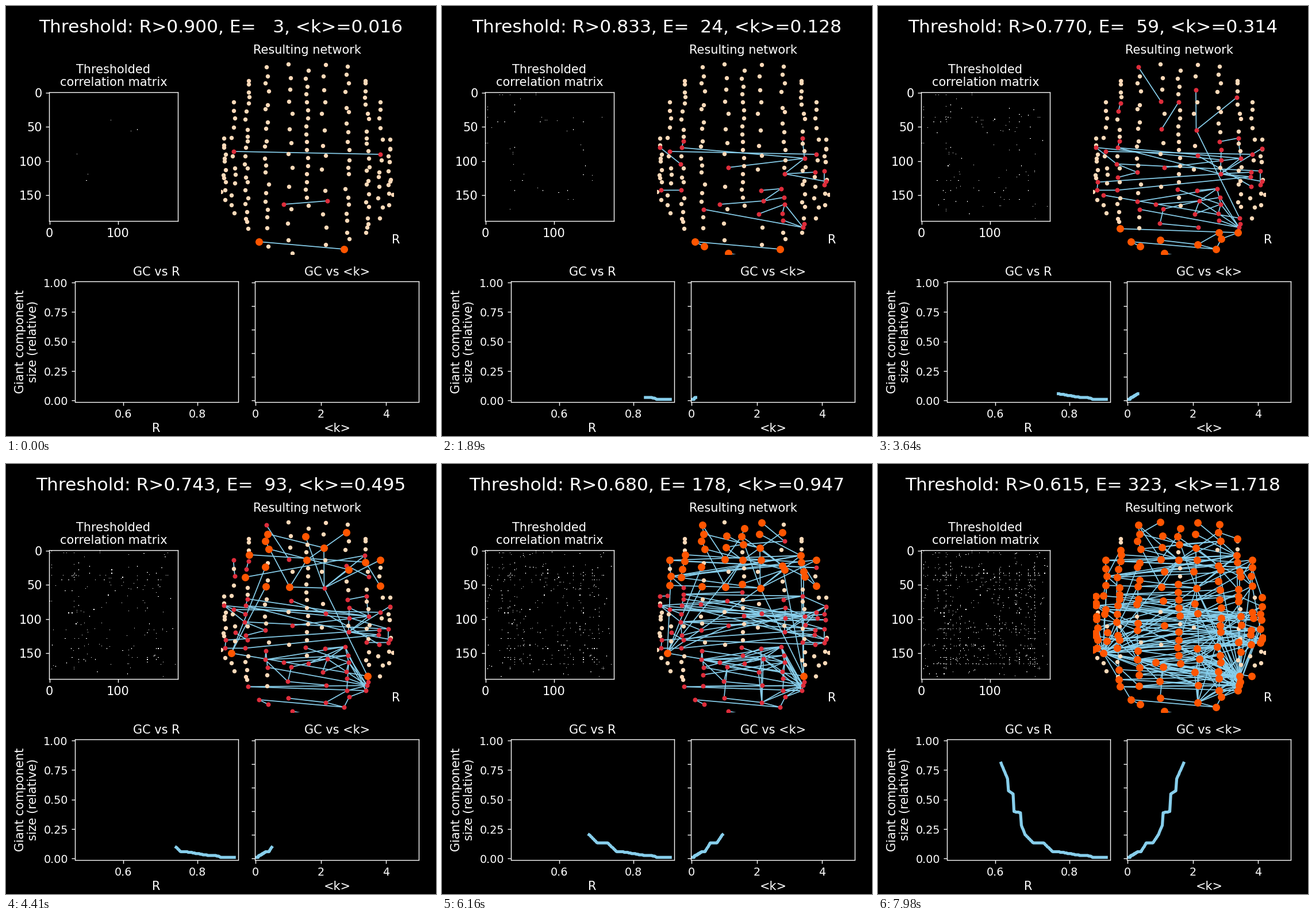
A matplotlib script that plays this animation: 748 by 748 pixels, repeating every 8 s.

```python
import numpy as np
import matplotlib.pyplot as plt
from matplotlib.animation import FuncAnimation
from matplotlib.collections import LineCollection

SIZE, DPI = 748, 125
PT = 72 / DPI
N, STEPS, STEP_MS, TICK_MS = 188, 115, 70, 50
MID_X = 523.5
SKY, PALE, RED, ORANGE = "skyblue", "#ffdab9", "#de2d3b", "#ff5500"

# Node columns: distance from the midline, number of pairs, top, bottom
COLUMNS = [(30, 15, 98, 426), (70, 21, 106, 416), (105, 23, 126, 392),
           (128, 13, 168, 360), (146, 13, 231, 333)]
FIRST_LINKS = [(396, 253), (651, 258), (483, 345), (559, 339), (440, 410), (588, 423)]
ANCHORS = [(392, 329), (629, 369)]

# Node order: frontal core, frontal rim, lowest back, rest of back, then the middle
CORE, FRONT, LOW, BACK, MIDDLE, OUTER = 25, 41, 52, 74, 104, 134
SWITCH = 58  # step at which the frontal component overtakes the back one

EDGE_KEYS = [(0, 3), (27, 24), (52, 59), (72, 120), (88, 178), (98, 232), (114, 323)]
GIANT_KEYS = [(0, 2), (14, 2), (20, 5), (28, 5), (52, 11), (58, 11), (68, 25),
              (79, 25), (88, 38), (92, 53), (93, 73), (100, 75), (101, 103),
              (106, 108), (107, 127), (114, 152)]

rng = np.random.default_rng(5)


def keyed(keys):
    at, value = zip(*keys)
    return np.rint(np.interp(np.arange(STEPS), at, value)).astype(int)


edge_count, giant = keyed(EDGE_KEYS), keyed(GIANT_KEYS)
cutoff = 0.9 - 0.0025 * np.arange(STEPS)
degree = edge_count / N


def scatter_nodes():
    """Mirrored columns of jittered dots plus the midline."""
    parts = []
    for dx, pairs, top, bottom in COLUMNS:
        y = np.linspace(top, bottom, pairs) + rng.uniform(-5, 5, pairs)
        off = dx + rng.uniform(-5, 4, pairs)
        tilt = 0.03 * (y - 120) + rng.uniform(-3, 3, pairs)
        parts += [np.c_[MID_X - off, y], np.c_[MID_X + off, y + tilt]]
    count = N - sum(len(p) for p in parts)
    parts.append(np.c_[MID_X + rng.uniform(-3, 3, count), np.linspace(112, 347, count)])
    return np.vstack(parts)


def snap(points, taken):
    """Move the nearest free node onto each key point."""
    found = []
    for p in points:
        gap = np.hypot(*(nodes - p).T)
        gap[taken + found] = np.inf
        found.append(int(np.argmin(gap)))
        nodes[found[-1]] = p
    return found


def joining_order(first, anchors):
    x, y = nodes.T
    off = np.abs(x - MID_X)
    left = np.ones(N, bool)
    order = []

    def pick(mask, key, count):
        ids = np.flatnonzero(mask & left)
        ids = ids[np.argsort(key[ids])][:count]
        left[ids] = False
        order.extend(ids)

    front = y < 218
    front[anchors] = True
    chance = rng.random(N)
    key = chance + 0.5 * (y < 112)
    key[anchors] = -1
    pick(front, key, FRONT)

    key = -y
    key[first[4:]] = -SIZE
    pick((y > 300) & (off < 95) | (y > 375), key, BACK - FRONT)

    loose = (y > 318) & (off > 95) | (y < 200) & (off < 8)
    key = chance + 0.6 * loose
    key[first[:2]] = -1
    pick(left, key, N)
    return np.array(order)


def grow_network(first, anchors):
    """Links in order of strength; regions stay apart until they join."""
    join, early = np.full(N, 999), np.full(N, SWITCH)
    for step in reversed(range(STEPS)):
        if step >= SWITCH:
            join[:giant[step]] = step
        else:
            early[FRONT:FRONT + giant[step]] = step

    index = np.arange(N)
    region = np.searchsorted([CORE, FRONT, LOW, BACK, MIDDLE, OUTER], index, side="right")
    in_back = (index >= FRONT) & (index < BACK)
    a, b = np.triu_indices(N, 1)
    opens = np.where(in_back[a] & in_back[b], np.maximum(early[a], early[b]),
                     np.maximum(join[a], join[b]))
    opens[(region[a] == region[b]) & (region[a] != 2) & (region[a] < 6)] = 0

    # The middle favours level links, front and back also steep ones
    dx, dy = (nodes[a] - nodes[b]).T
    level = (a >= BACK) & (b >= BACK)
    near = np.hypot(np.where(level, 0.3, 0.5) * dx, np.where(level, 1.3, 0.6) * dy)
    across = np.hypot(nodes[a, 0] + nodes[b, 0] - 2 * MID_X, dy)
    pull = rng.lognormal(0, 0.3, N)
    pull[anchors] = 0.4
    score = (25 + np.minimum(near, 10 + across)) * pull[a] * pull[b]
    score *= rng.uniform(0.3, 1.7, a.size)

    links = []
    linked = np.zeros(N, bool)

    def take(k):
        links.append((a[k], b[k]))
        linked[[a[k], b[k]]] = True
        score[k] = np.inf

    for i, j in zip(first[::2], first[1::2]):
        take(np.flatnonzero((a == min(i, j)) & (b == max(i, j)))[0])
    for step in range(STEPS):
        cost = np.where(opens <= step, score, np.inf)
        member = join <= step if step >= SWITCH else early <= step
        for node in np.flatnonzero(member & ~linked):
            mine = np.where((a == node) | (b == node), cost, np.inf)
            if len(links) < edge_count[step] and mine.min() < np.inf:
                k = np.argmin(mine)
                take(k)
                cost[k] = np.inf
        for k in np.argsort(cost)[:edge_count[step] - len(links)]:
            take(k)
    return np.array(links)


nodes = scatter_nodes()
first = snap(FIRST_LINKS, [])
anchors = snap(ANCHORS, first)
order = joining_order(first, anchors)
nodes = nodes[order]
place = np.argsort(order)
links = grow_network(place[first], place[anchors])
cell_ids = rng.permutation(N)

plt.rcParams.update({
    "font.family": "DejaVu Sans", "font.size": 12, "text.color": "white",
    "axes.facecolor": "black", "axes.edgecolor": "white",
    "xtick.color": "white", "ytick.color": "white"})
fig = plt.figure(figsize=(SIZE / DPI, SIZE / DPI), dpi=DPI, facecolor="black")


def box(left, top, right, bottom, font=12):
    ax = fig.add_axes([left / SIZE, 1 - bottom / SIZE,
                       (right - left) / SIZE, (bottom - top) / SIZE])
    ax.tick_params(labelsize=font)
    return ax


def label(x, y, text, **kw):
    style = dict(ha="center", va="baseline") | kw
    return fig.text(x / SIZE, 1 - y / SIZE, text, **style)


title = label(374, 46, "", fontsize=18)
label(187, 117, "Thresholded")
label(187, 139, "correlation matrix")
label(524, 83, "Resulting network")
label(678, 413, "R")
label(262, 469, "GC vs R")
label(576, 469, "GC vs <k>")
label(261, 741, "R")
label(576, 741, "<k>")
label(25, 584, "Giant component", rotation=90, va="center")
label(47.5, 584, "size (relative)", rotation=90, va="center")

matrix_ax = box(75, 150, 299, 374)
image = matrix_ax.imshow(np.zeros((N, N)), cmap="gray", vmin=0, vmax=1,
                         interpolation="nearest", aspect="auto")
matrix_ax.set(xticks=[0, 100], yticks=[0, 50, 100, 150])

net_ax = box(374, 94, 674, 431.5)
net_ax.set(xlim=(374, 674), ylim=(431.5, 94))
net_ax.axis("off")
wires = LineCollection([], colors=SKY, linewidths=1, zorder=1)
net_ax.add_collection(wires)
dots = [net_ax.scatter([], [], s=(px * PT) ** 2, color=color, linewidths=0, zorder=z)
        for z, (px, color) in enumerate([(7.4, PALE), (8, RED), (13, ORANGE)], 2)]


def curve_axes(left, right, xlim, xticks, yticks):
    ax = box(left, 479, right, 688.5, 11)
    ax.set(xlim=xlim, ylim=(-0.01, 1.01), xticks=xticks, yticks=yticks)
    line, = ax.plot([], [], color=SKY, lw=3, solid_capstyle="projecting")
    return ax, line


_, r_line = curve_axes(120, 404, (0.4685, 0.9106), [0.6, 0.8], np.linspace(0, 1, 5))
k_ax, k_line = curve_axes(433, 718, (-0.02, 5), [0, 2, 4], np.linspace(0, 1, 6))
k_ax.set_yticklabels([])


def draw(tick):
    step = (tick * TICK_MS + STEP_MS - 30) // STEP_MS
    shown = links[:edge_count[step]]
    title.set_text(f"Threshold: R>{cutoff[step] + 1e-9:.3f}, "
                   f"E={edge_count[step]:4d}, <k>={degree[step]:.3f}")

    cells = np.zeros((N, N))
    i, j = cell_ids[shown].T
    cells[i, j] = cells[j, i] = 1
    image.set_data(cells)

    start = FRONT if step < SWITCH else 0
    state = np.zeros(N, int)
    state[shown.ravel()] = 1
    state[start:start + giant[step]] = 2
    wires.set_segments(nodes[shown])
    for kind, group in enumerate(dots):
        group.set_offsets(nodes[state == kind])

    size = giant[:step + 1] / N
    r_line.set_data(cutoff[:step + 1], size)
    k_line.set_data(degree[:step + 1], size)
    return [title, image, wires, *dots, r_line, k_line]


anim = FuncAnimation(fig, draw, frames=8000 // TICK_MS, interval=TICK_MS,
                     repeat=True, repeat_delay=0, blit=False)
plt.show()
```
